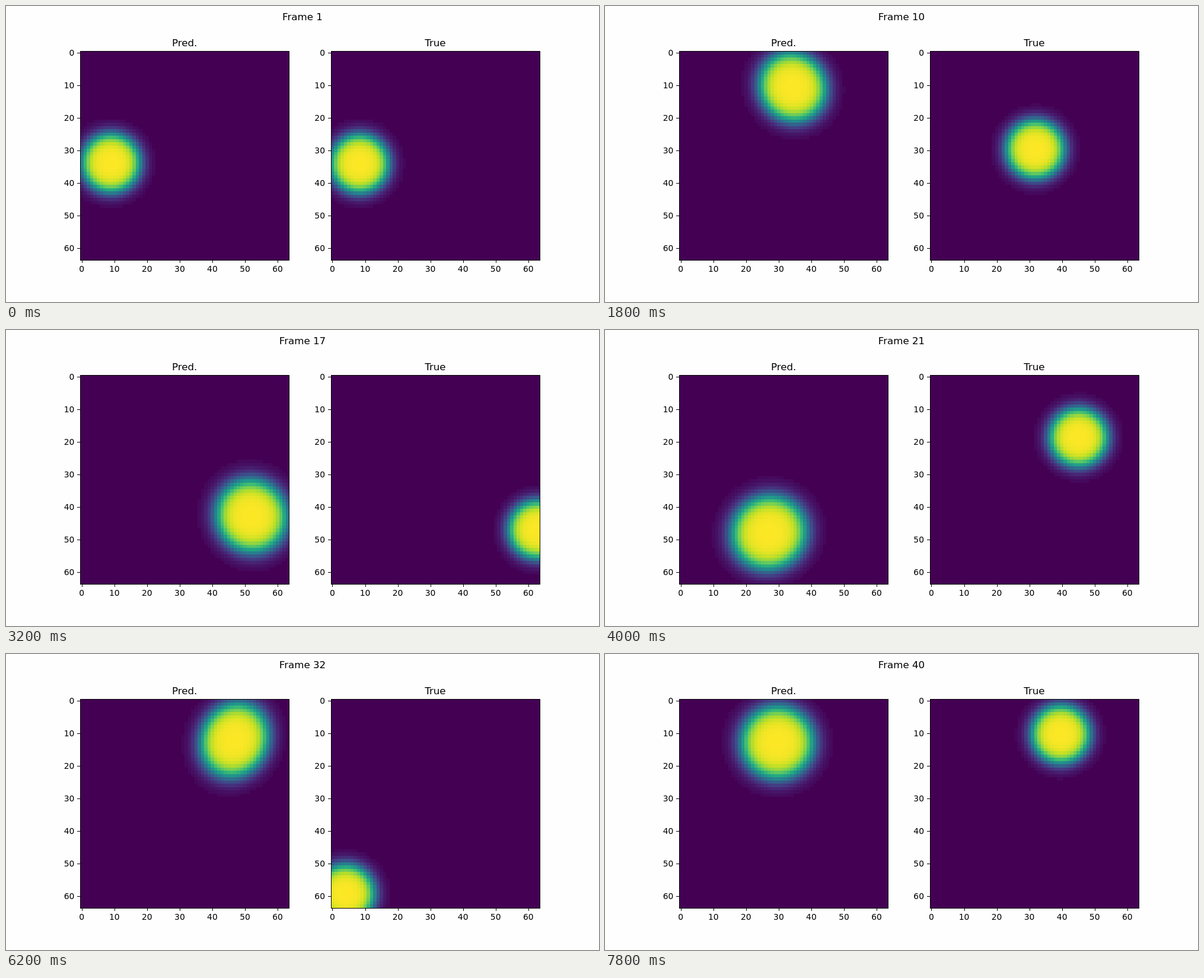
These frames come from a looping animation (1000x500 px, 8 s). An HTML page with a canvas:

```html
<!DOCTYPE html>
<html lang="en">
<head>
<meta charset="utf-8">
<title>Predicted and true ball</title>
<style>
  html, body { margin: 0; width: 100%; height: 100%; overflow: hidden; background: #fefefe; }
  canvas { display: block; }
</style>
</head>
<body>
<canvas id="stage" width="1000" height="500"></canvas>
<script>
const ctx = document.getElementById('stage').getContext('2d');
const STEP = 200, COUNT = 40;
const GRID = 64, WALL = 63, SIZE = 352.27, CELL = SIZE / GRID, TOP = 76.36;
const PRED_LEFT = 125, TRUE_LEFT = 547.73;
const EDGE = 13.7;

const viridis = ['440154', '482475', '414487', '355f8d', '2a788e', '21918c',
  '22a884', '44bf70', '7ad151', 'bddf26', 'fde725']
  .map(hex => [0, 2, 4].map(i => parseInt(hex.slice(i, i + 2), 16)));

// Step, unfolded x and y, radii, tilt
const predicted = [
  [1, -8.9, -33.8, 13.7, 13.7, 0],
  [6, 16, -4.8, 15.5, 15, 0],
  [13, 48, 22, 15.8, 17, 0.1],
  [19, 87, 53, 17, 17, 0],
  [21, 99, 47.8, 17.5, 17.2, -0.04],
  [25, 123, 35.5, 17.5, 18, 0],
  [32, 172.8, 12, 15.9, 17.3, -0.1],
  [40, 222.4, -12.8, 17, 17, 0]
];

const lerp = (a, b, t) => a + (b - a) * t;

// Reflects a free path between the two walls
function bounce(u) {
  const m = Math.abs(u) % (2 * WALL);
  return m > WALL ? 2 * WALL - m : m;
}

function trueBall(n) {
  return { x: bounce(-8.3 + 4.46 * (n - 1)), y: bounce(-34 + 7.07 * (n - 1)),
    rx: EDGE, ry: EDGE, tilt: 0 };
}

function predictedBall(n) {
  const i = Math.max(1, predicted.findIndex(k => k[0] >= n));
  const a = predicted[i - 1], b = predicted[i];
  const t = (n - a[0]) / (b[0] - a[0]);
  const [, x, y, rx, ry, tilt] = a.map((v, j) => lerp(v, b[j], t));
  return { x: bounce(x), y: bounce(y), rx, ry, tilt };
}

function intensity(ball, col, row) {
  const dx = (col - ball.x) / ball.rx, dy = (row - ball.y) / ball.ry;
  const r = EDGE * Math.sqrt(dx * dx + dy * dy - 2 * ball.tilt * dx * dy);
  return r > EDGE + 0.05 ? 0 : 1 / (1 + Math.exp((r - 8.8) / 1.25));
}

function colour(v) {
  const p = v * (viridis.length - 1);
  const i = Math.min(viridis.length - 2, Math.floor(p));
  const rgb = viridis[i].map((c, j) => Math.round(lerp(c, viridis[i + 1][j], p - i)));
  return `rgb(${rgb})`;
}

function text(str, x, y, size, align) {
  ctx.font = `${size}px "DejaVu Sans", sans-serif`;
  ctx.textAlign = align;
  ctx.fillText(str, x, y);
}

function drawAxes(left, title) {
  const x0 = Math.round(left), x1 = Math.round(left + SIZE);
  const y0 = Math.round(TOP), y1 = Math.round(TOP + SIZE);
  ctx.fillStyle = '#000';
  ctx.fillRect(x0, y0, x1 - x0 + 1, 1);
  ctx.fillRect(x0, y1, x1 - x0 + 1, 1);
  ctx.fillRect(x0, y0, 1, y1 - y0 + 1);
  ctx.fillRect(x1, y0, 1, y1 - y0 + 1);
  for (let v = 0; v < GRID; v += 10) {
    const offset = (v + 0.5) * CELL;
    ctx.fillRect(Math.round(left + offset), y1 + 1, 1, 4);
    ctx.fillRect(x0 - 5, Math.round(TOP + offset), 5, 1);
    text(v, left + offset, 449, 13.89, 'center');
    text(v, left - 9.7, Math.round(TOP + offset) + 5, 13.89, 'right');
  }
  text(title, left + SIZE / 2, 68, 16.67, 'center');
}

function drawPanel(left, title, ball) {
  const edgeX = c => Math.round(left + c * CELL);
  const edgeY = r => Math.round(TOP + r * CELL);
  ctx.fillStyle = colour(0);
  ctx.fillRect(edgeX(0), edgeY(0), edgeX(GRID) - edgeX(0), edgeY(GRID) - edgeY(0));
  for (let row = 0; row < GRID; row++) {
    for (let col = 0; col < GRID; col++) {
      const v = intensity(ball, col, row);
      if (!v) continue;
      ctx.fillStyle = colour(v);
      ctx.fillRect(edgeX(col), edgeY(row),
        edgeX(col + 1) - edgeX(col), edgeY(row + 1) - edgeY(row));
    }
  }
  drawAxes(left, title);
}

function draw(n) {
  ctx.fillStyle = '#fefefe';
  ctx.fillRect(0, 0, 1000, 500);
  drawPanel(PRED_LEFT, 'Pred.', predictedBall(n));
  drawPanel(TRUE_LEFT, 'True', trueBall(n));
  text(`Frame ${n}`, 500, 24, 16.67, 'center');
}

let start, shown;
function tick(now) {
  start ??= now;
  const n = Math.floor((now - start) / STEP) % COUNT + 1;
  if (n !== shown) draw(shown = n);
  requestAnimationFrame(tick);
}
draw(shown = 1);
requestAnimationFrame(tick);
</script>
</body>
</html>
```
